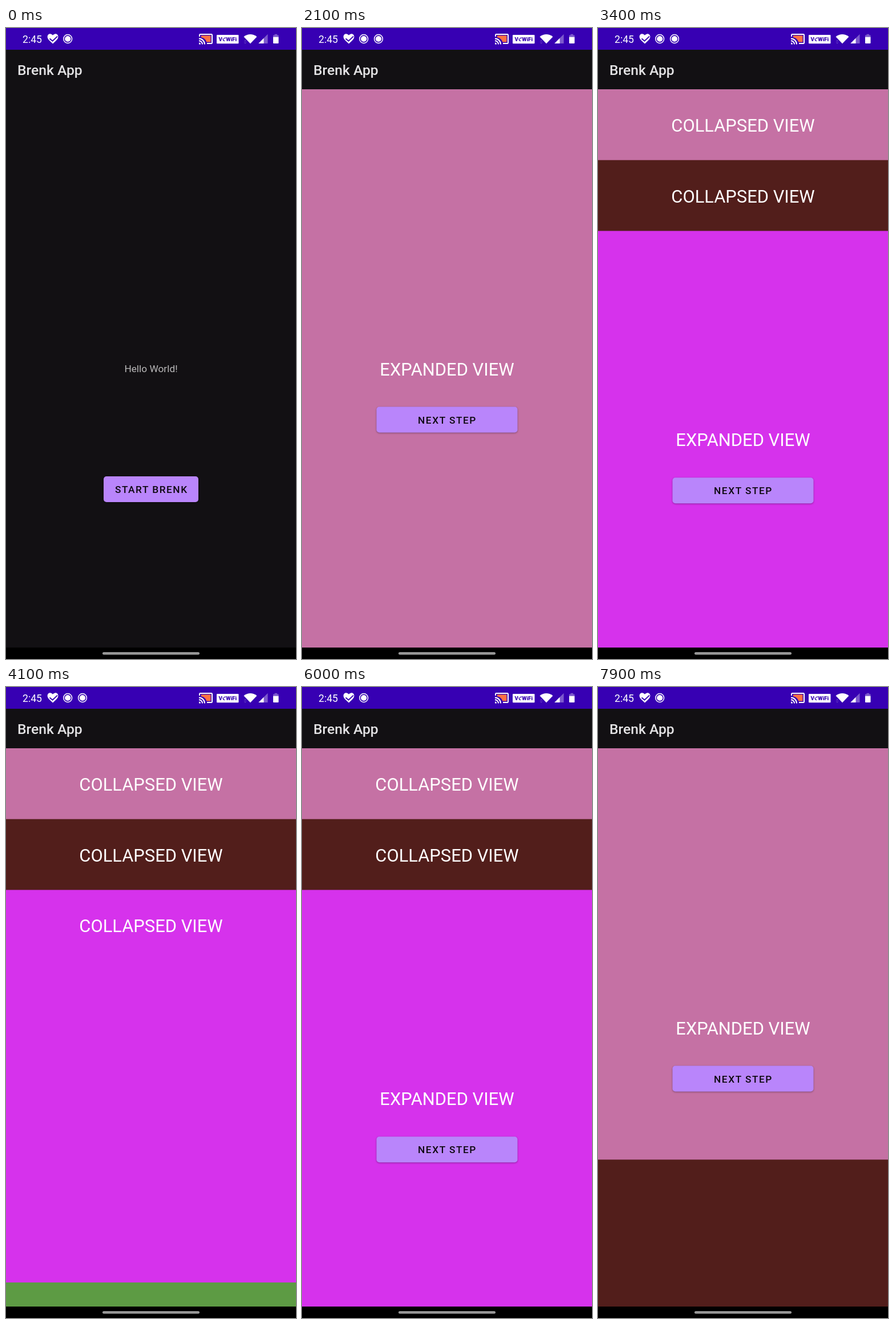
An HTML page that plays this animation: 508x1102 px, repeating every 8 s.

```html
<!DOCTYPE html>
<html lang="en">
<head>
<meta charset="utf-8">
<title>Collapsing panels</title>
<style>
  html, body { margin: 0; width: 100%; height: 100%; overflow: hidden; background: #121013; }
  svg { display: block; width: 100vw; height: 100vh; font-family: Roboto, sans-serif; }
  .label { font-size: 30.9px; fill: #fff; text-anchor: middle; }
  .button rect { fill: #b985fb; filter: drop-shadow(0 1.5px 1.5px rgba(0, 0, 0, .35)); }
  .button text { font-size: 17.3px; font-weight: 500; letter-spacing: 1.54px; text-anchor: middle; fill: #0c080f; }
</style>
</head>
<body>
<svg viewBox="0 0 508 1102" preserveAspectRatio="none">
  <defs>
    <clipPath id="content"><rect y="107" width="508" height="975"/></clipPath>
    <radialGradient id="glow">
      <stop offset="0" stop-color="#fff" stop-opacity=".62"/>
      <stop offset=".74" stop-color="#fff" stop-opacity=".62"/>
      <stop offset=".82" stop-color="#fff" stop-opacity=".3"/>
      <stop offset="1" stop-color="#fff" stop-opacity="0"/>
    </radialGradient>
    <g id="record">
      <circle r="7.4" fill="none" stroke="#fff" stroke-width="1.5"/>
      <circle r="5.1" fill="#fff"/>
    </g>
  </defs>

  <rect width="508" height="1102" fill="#121013"/>
  <text x="20" y="82" font-size="24.7" font-weight="500" fill="#e3e2e4">Brenk App</text>

  <g id="home">
    <text x="254" y="601.3" font-size="17.3" text-anchor="middle" fill="#b8b7b8">Hello World!</text>
    <g class="button">
      <rect x="171" y="783" width="166" height="45" rx="5"/>
      <text x="254.8" y="812">START BRENK</text>
    </g>
  </g>

  <g id="panels" clip-path="url(#content)"></g>
  <circle id="touch" r="17" fill="url(#glow)"/>

  <rect width="508" height="38" fill="#3700b3"/>
  <text x="29" y="25.6" font-size="17.6" fill="#fff">2:45</text>
  <path d="M82 27.5C76 22 72.6 19.2 72.6 15.2C72.6 9.6 79.2 8.4 82 12.8C84.8 8.4 91.4 9.6 91.4 15.2C91.4 19.2 88 22 82 27.5Z" fill="#fff"/>
  <path d="M76.5 18.5L81.5 22.8L90 14.6" fill="none" stroke="#3700b3" stroke-width="1.9"/>
  <use href="#record" x="108.2" y="19"/>
  <use href="#record" id="second" x="134" y="19"/>

  <path d="M342 13.2H358.6V24.6H351.5Q349 17.5 342 16.6Z" fill="#ff7043"/>
  <g fill="none" stroke="#fff" stroke-width="2">
    <path d="M339 15V12.2Q339 11 340.2 11H359.8Q361 11 361 12.2V25.8Q361 27 359.8 27H352"/>
    <path d="M338 18.5A10 10 0 0 1 348 28.5M338 22.3A6 6 0 0 1 344 28.5"/>
  </g>
  <path d="M338 25.5A3 3 0 0 1 341 28.5H338Z" fill="#fff"/>

  <rect x="369" y="12" width="38.5" height="15.2" rx="1" fill="#fff"/>
  <g font-size="9.6" font-weight="800" fill="#3700b3">
    <text x="372.5" y="23">V</text>
    <text x="385.3" y="23">WiFi</text>
  </g>
  <path d="M380.5 18.2Q379.6 22.5 383 22.4M382.5 18.8L384.3 16.5" fill="none" stroke="#3700b3" stroke-width="1.5"/>

  <path d="M416.5 15.2Q428 6.8 439.5 15.2L428 27.2Z" fill="#fff"/>
  <path d="M417.5 23.5L419 21.8L420.5 23.5M417.5 25.2L419 26.8L420.5 25.2" fill="none" stroke="#fff" stroke-opacity=".35"/>
  <path d="M458.5 10.8V27H442.3Z" fill="#fff" opacity=".35"/>
  <path d="M451.5 17.8V27H442.3Z" fill="#fff"/>
  <path d="M468 16V12.5H470.5V10.8H475V12.5H477.5V16Z" fill="#fff" opacity=".35"/>
  <path d="M468 15.8H477.5V26Q477.5 27 476.5 27H469Q468 27 468 26Z" fill="#fff"/>

  <rect y="1082" width="508" height="20"/>
  <rect x="169" y="1090" width="170" height="4.4" rx="2.2" fill="#979797"/>
</svg>
<script>
const LOOP = 8000, SLIDE = 300, TOP = 107, BOTTOM = 1082, STEP = 123.7;
const byId = id => document.getElementById(id);

// Each panel slides in at `open` and back out at `close`.
const panels = [
  { color: '#c571a4', open: 1250, close: Infinity },
  { color: '#521e1b', open: 2350, close: 7712 },
  { color: '#d632ec', open: 3080, close: 6300 },
  { color: '#5d9b44', open: 4050, close: 5400 },
];
const taps = [
  { from: 300, to: 600, x: 277, y: 805 },
  { from: 2180, to: 2320, x: 277, y: 684 },
  { from: 2900, to: 3060, x: 277, y: 735 },
  { from: 3880, to: 4030, x: 277, y: 797 },
  { from: 4950, to: 5150, x: 408, y: 417 },
  { from: 6130, to: 6250, x: 408, y: 293 },
  { from: 7350, to: 7600, x: 430, y: 170 },
];

panels.forEach((panel, i) => {
  panel.top = TOP + i * STEP;
  const height = BOTTOM - panel.top, middle = height / 2;
  byId('panels').insertAdjacentHTML('beforeend', `<g>
    <rect width="508" height="${height}" fill="${panel.color}"/>
    <g>
      <text class="label" x="254" y="${middle + 12}">EXPANDED VIEW</text>
      <g class="button">
        <rect x="130.5" y="${middle + 67}" width="247" height="45" rx="5"/>
        <text x="254.5" y="${middle + 96}">NEXT STEP</text>
      </g>
    </g>
    <text class="label" x="254" y="${STEP / 2 + 12.1}">COLLAPSED VIEW</text>
  </g>`);
  panel.node = byId('panels').lastElementChild;
  [, panel.expanded, panel.collapsed] = panel.node.children;
});

const clamp = v => Math.max(0, Math.min(1, v));
const ease = p => (1 - Math.cos(Math.PI * clamp(p))) / 2;
const show = (node, on) => node.setAttribute('visibility', on ? 'visible' : 'hidden');

function draw(t) {
  byId('home').setAttribute('opacity', 1 - clamp((t - 1000) / 200));
  show(byId('second'), t >= 1000 && t < 5000);

  panels.forEach((panel, i) => {
    const shown = ease((t - panel.open) / SLIDE) - ease((t - panel.close) / SLIDE);
    const y = BOTTOM + (panel.top - BOTTOM) * shown;
    panel.node.setAttribute('transform', `translate(0 ${y})`);
    const next = panels[i + 1];
    const covered = Boolean(next) && t >= next.open && t < next.close;
    show(panel.expanded, !covered);
    show(panel.collapsed, covered);
  });

  const tap = taps.find(({ from, to }) => t >= from && t < to);
  show(byId('touch'), tap);
  if (tap) byId('touch').setAttribute('transform', `translate(${tap.x} ${tap.y})`);
}

const start = performance.now();
function frame() {
  draw((performance.now() - start) % LOOP);
  requestAnimationFrame(frame);
}
frame();
</script>
</body>
</html>
```
